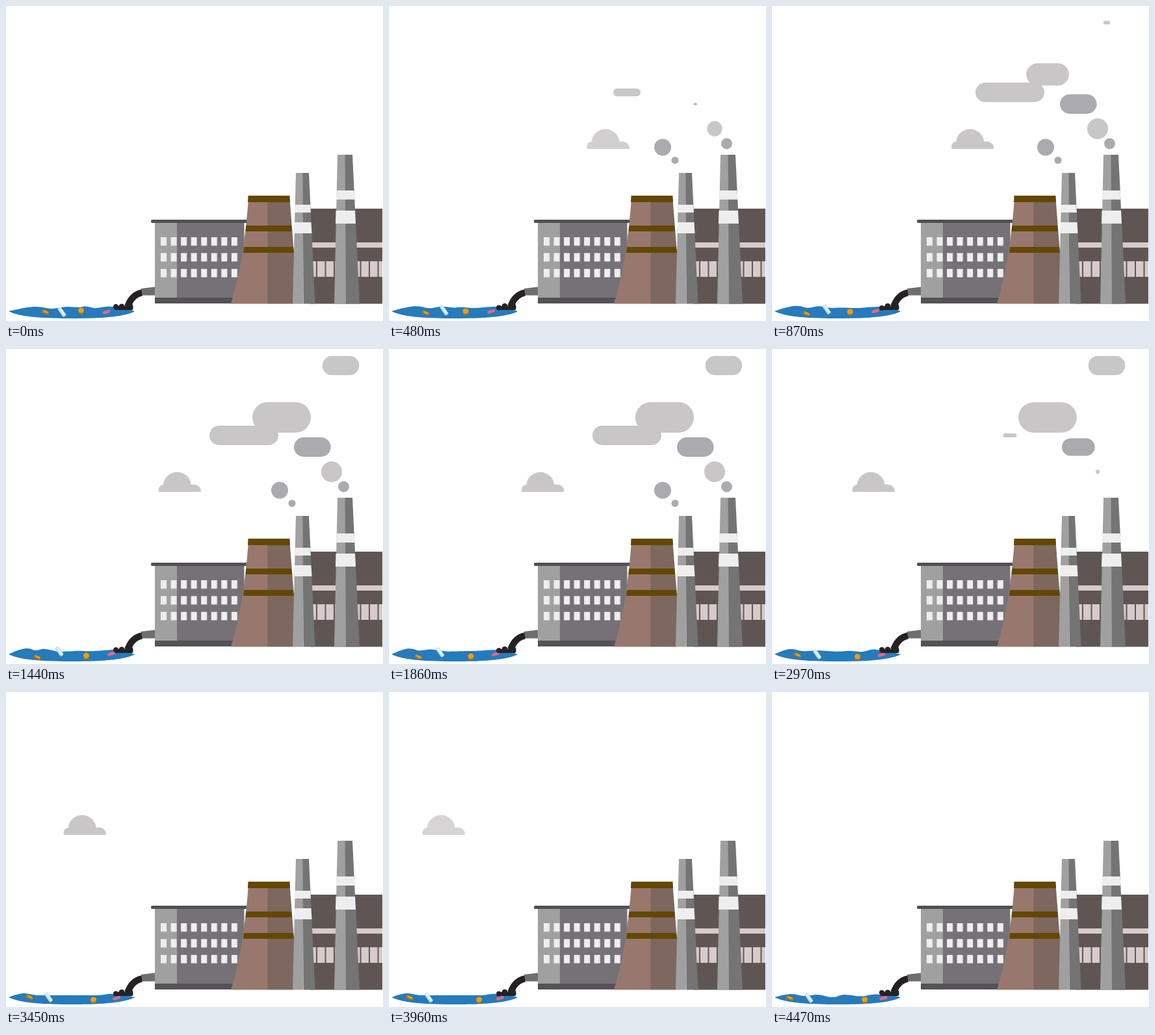
Recreate the animation shown at these times as an HTML page without scripts. Size 580x485 px, loop 4.5 s.

```html
<!DOCTYPE html>
<html lang="en">
<head>
<meta charset="utf-8">
<title>Factory pollution</title>
<style>
  html, body { margin: 0; width: 100%; height: 100%; overflow: hidden; background: #fff; }
  svg { display: block; width: 580px; height: 485px; }
  .smoke { fill: #c8c6c7; }
  .fume { fill: #abaab1; }
  .light { fill: #a0a0a0; }
  .dark { fill: #747474; }
  .white { fill: #eee; }
  .ring { fill: #644700; }
  .tar { fill: #262124; }
  .cloud { animation: drift 4.5s linear infinite, appear 4.5s linear infinite; }
  @keyframes drift {
    from { transform: translate(339.5px, 189px); }
    to { transform: translate(12.5px, 189px); }
  }
  @keyframes appear {
    0%, 4% { opacity: 0; }
    12%, 86% { opacity: 1; }
    94%, 100% { opacity: 0; }
  }
</style>
</head>
<body>
<svg viewBox="0 0 580 485">
  <defs>
    <pattern id="windows" x="238" y="356" width="15.55" height="24.4" patternUnits="userSpaceOnUse">
      <rect class="white" width="9" height="13"/>
    </pattern>
    <pattern id="panes" x="479" y="393" width="13.5" height="24" patternUnits="userSpaceOnUse">
      <rect width="11.5" height="24" fill="#d8cacb"/>
    </pattern>
    <clipPath id="basin">
      <path d="M4 470L0 450H202L198 470C185 478 150 481 105 481S20 479 4 470Z"/>
    </clipPath>
  </defs>

  <!-- smoke puffs -->
  <g transform="translate(440 237.5)"><circle class="fume" r="5.5">
    <animateTransform attributeName="transform" type="scale" dur="4.5s" repeatCount="indefinite" values="0;0;1;1;0;0" keyTimes="0;.0067;.08;.5133;.58;1"/>
  </circle></g>
  <g transform="translate(421 217.5)"><circle class="fume" r="13">
    <animateTransform attributeName="transform" type="scale" dur="4.5s" repeatCount="indefinite" values="0;0;1;1;0;0" keyTimes="0;.0267;.1;.56;.6267;1"/>
  </circle></g>
  <g transform="translate(519.5 212)"><circle class="fume" r="8.5">
    <animateTransform attributeName="transform" type="scale" dur="4.5s" repeatCount="indefinite" values="0;0;1;1;0;0" keyTimes="0;.0267;.1;.56;.6267;1"/>
  </circle></g>
  <g transform="translate(501 189)"><circle class="smoke" r="16">
    <animateTransform attributeName="transform" type="scale" dur="4.5s" repeatCount="indefinite" values="0;0;1;1;0;0" keyTimes="0;.0533;.1267;.6067;.6733;1"/>
  </circle></g>
  <g transform="translate(366 133)"><rect class="smoke" x="-53" y="-15" width="106" height="30" rx="15">
    <animateTransform attributeName="transform" type="scale" dur="4.5s" repeatCount="indefinite" values="0;0;1;1;0;0" keyTimes="0;.0778;.1511;.6067;.6733;1"/>
  </rect></g>
  <g transform="translate(471.3 151)"><rect class="fume" x="-28.3" y="-15" width="56.6" height="30" rx="15">
    <animateTransform attributeName="transform" type="scale" dur="4.5s" repeatCount="indefinite" values="0;0;1;1;0;0" keyTimes="0;.1;.1733;.6533;.72;1"/>
  </rect></g>
  <g transform="translate(424 105.3)"><rect class="smoke" x="-45" y="-23.5" width="90" height="47" rx="23.5">
    <animateTransform attributeName="transform" type="scale" dur="4.5s" repeatCount="indefinite" values="0;0;1;1;0;0" keyTimes="0;.14;.2133;.66;.7267;1"/>
  </rect></g>
  <g transform="translate(515 25.5)"><rect class="smoke" x="-28.3" y="-14.7" width="56.6" height="29.4" rx="14.7">
    <animateTransform attributeName="transform" type="scale" dur="4.5s" repeatCount="indefinite" values="0;0;1;1;0;0" keyTimes="0;.18;.2533;.7;.7667;1"/>
  </rect></g>

  <path class="smoke cloud" d="M0 31V28C0 23 3 20 7 20A21.6 21.6 0 0 1 50 20C58 18 65 23 65 29V31Z"/>

  <!-- rear hall -->
  <path fill="#5f5654" d="M468 312H579V458.500H468Z"/>
  <path fill="#d8cacb" d="M468 364H579V372H468Z"/>
  <path fill="url(#panes)" d="M472 393H579V417H472Z"/>

  <!-- main block -->
  <path fill="#757177" d="M229 333H366.500V458H229Z"/>
  <path class="light" d="M229 333H263V458H229Z"/>
  <path fill="#545256" d="M229 449H360V458H229Z"/>
  <rect x="223" y="329" width="149" height="5" rx="2" fill="#514f53"/>
  <path fill="url(#windows)" d="M238 356H358V418H238Z"/>

  <!-- cooling tower -->
  <path fill="#98786e" d="M373 297H403V458.500H346Q365 400 373 297Z"/>
  <path fill="#7d675f" d="M402.500 297H436.500L443 380V458.500H402.500Z"/>
  <path class="ring" d="M372.500 292H436.500L437 302H372ZM369.500 338H439L440 347H368.500ZM366 371H442L443 380H365Z"/>

  <!-- chimneys -->
  <path class="light" d="M446 257H457V458.500H441Z"/>
  <path class="dark" d="M456.500 257H466L475.500 458.500H457.500Z"/>
  <path class="white" d="M444.500 306H468L469 318H444ZM443.500 333H469.500L470.500 350H443Z"/>
  <path class="light" d="M510 229H522L524 458.500H505Z"/>
  <path class="dark" d="M521.500 229H533L544 458.500H523Z"/>
  <path class="white" d="M508.500 284H535.500L536.500 298H508ZM507.500 315H537L538 335H507Z"/>

  <!-- water -->
  <g clip-path="url(#basin)">
    <path fill="#267bbc">
      <animate attributeName="d" dur="4.5s" repeatCount="indefinite" keyTimes="0;.32;.66;.7667;1" values="
        M4 470S32 463 45 463S62 466 70 466S86 463 95 463S109 465 118 463S132 466 140 465S153 462 164 463S185 465 198 470V482H4Z;
        M4 470S22 461 32 461S39 464 46 464S53 461 61 462S75 466 84 466S110 464 120 465S150 464 164 463S185 465 198 470V482H4Z;
        M4 470S20 462 29 462S42 466 55 465S75 464 85 465S105 466 115 465S135 468 145 465S156 462 166 464S185 466 198 470V482H4Z;
        M4 470S20 463 30 464S42 467 52 467S75 467 85 467S105 467 115 467S131 467 141 467S156 464 166 465S185 466 198 470V482H4Z;
        M4 470S20 465 30 465S41 468 50 468S62 466 70 466S84 470 93 470S102 466 112 466S134 470 143 468S156 465 166 466S185 466 198 470V482H4Z"/>
    </path>
  </g>

  <!-- floating litter -->
  <g>
    <animateTransform attributeName="transform" type="translate" dur="4.5s" repeatCount="indefinite" keyTimes="0;.1933;.32;.5133;.66;.7667;1" values="60.5 471.500;53 474;48 475;42 474;39 471.500;36 470;27 471.500"/>
    <g transform="rotate(20)">
      <rect x="-6" y="-2.500" width="12" height="5" rx="2" fill="#a8751f"/>
      <path fill="#eda016" d="M-5-2.500H3L5 0L-1 1Z"/>
    </g>
  </g>
  <g>
    <animateTransform attributeName="transform" type="translate" dur="4.5s" repeatCount="indefinite" keyTimes="0;.1933;.32;.5133;.66;.7667;1" values="86 471;84 467;82 465.500;75 468.500;69.500 470;65.500 470;56.500 471"/>
    <g transform="rotate(55)">
      <rect x="-8" y="-3" width="16" height="6" rx="1.500" fill="#b9dcef"/>
      <path fill="#e3f3fa" d="M-7-2H6V1H-7Z"/>
    </g>
  </g>
  <g>
    <animateTransform attributeName="transform" type="translate" dur="4.5s" repeatCount="indefinite" keyTimes="0;.1933;.32;.5133;.66;.7667;1" values="115.500 469.500;120 471.500;123.500 473;128.500 474.500;131.500 474.500;134.500 474.500;143 474.500"/>
    <rect x="-4" y="-1" width="8" height="6" rx="2.500" fill="#a8751f"/>
    <ellipse cy="-1" rx="4.500" ry="4" fill="#f59c0a"/>
  </g>
  <g>
    <animateTransform attributeName="transform" type="translate" dur="4.5s" repeatCount="indefinite" keyTimes="0;.1933;.32;.5133;.66;.7667;1" values="154.500 471;159 469.500;162 469;166 470;168.500 470.500;170 471;171.500 471"/>
    <rect x="-6" y="-2" width="12" height="4.500" rx="2" fill="#e9677c" transform="rotate(-18)"/>
  </g>

  <!-- drain -->
  <path fill="#6f6d70" d="M208 435L229 432.500V445.500H208Z"/>
  <path d="M209 441.500Q194 444 187 463" fill="none" stroke="#262124" stroke-width="10"/>
  <rect class="tar" x="167" y="462" width="28.500" height="6" rx="2.500"/>
  <circle class="tar" cx="191" cy="462.500" r="4.500"/>
  <circle class="tar" cx="169" r="4">
    <animate attributeName="cy" dur="1.5s" repeatCount="indefinite" values="463;465.500;463"/>
  </circle>
  <circle class="tar" cx="178" r="4.500">
    <animate attributeName="cy" dur="1.5s" repeatCount="indefinite" values="463;462;463"/>
  </circle>
</svg>
</body>
</html>
```
